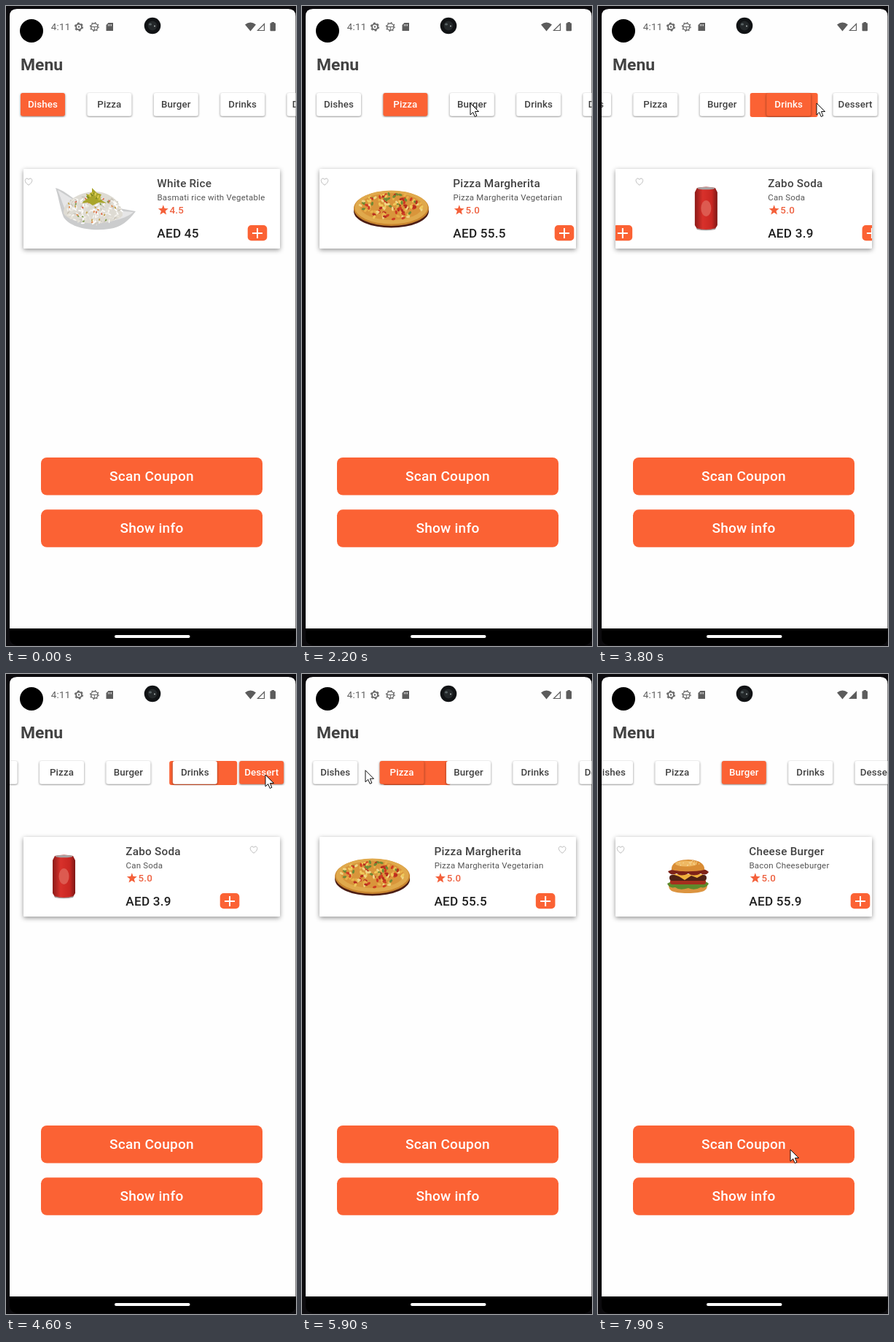
An HTML page that plays this animation: 398x876 px, repeating every 8 s.

```html
<!DOCTYPE html>
<html lang="en">
<head>
<meta charset="utf-8">
<title>Menu</title>
<style>
  html, body { margin: 0; width: 100%; height: 100%; overflow: hidden; background: #0c0b0e; }
  svg { display: block; }
  text { font-family: Roboto, sans-serif; font-weight: 500; letter-spacing: .24px; fill: #424242; }
  .mid { text-anchor: middle; }
  .lifted { filter: drop-shadow(0 1px 1.6px rgba(0,0,0,.48)); }
  .card { filter: drop-shadow(0 2px 3px rgba(0,0,0,.42)); }
  .tab rect { fill: #fff; }
  .tab text { font-size: 13.34px; letter-spacing: .1px; }
  .tab.on rect { fill: #fb6234; }
  .tab.on text { fill: #fff; }
</style>
</head>
<body>
<svg id="stage" width="398" height="876" viewBox="0 0 398 876"></svg>
<script>
const LOOP = 8000, PAGE = 352, PITCH = 91.4, ORANGE = '#fb6234';

let seed = 7;
const random = () => (seed = seed * 16807 % 2147483647) / 2147483647;

const ellipse = (x, y, rx, ry, fill) => `<ellipse cx="${x}" cy="${y}" rx="${rx}" ry="${ry}" fill="${fill}"/>`;
const rect = (x, y, w, h, r, fill) => `<rect x="${x}" y="${y}" width="${w}" height="${h}" rx="${r}" fill="${fill}"/>`;
const path = (d, fill, more = '') => `<path d="${d}" fill="${fill}" ${more}/>`;
const text = (x, y, size, words, more = '') => `<text x="${x}" y="${y}" font-size="${size}" ${more}>${words}</text>`;

// Small scattered grains inside an ellipse
function specks(count, x, y, rx, ry, w, h, colors) {
  let out = '';
  for (let i = 0; i < count; i++) {
    const a = random() * 2 * Math.PI, d = Math.sqrt(random());
    const px = x + Math.cos(a) * d * rx, py = y + Math.sin(a) * d * ry;
    out += `<ellipse rx="${w}" ry="${h}" fill="${colors[i % colors.length]}"
      transform="translate(${px.toFixed(1)} ${py.toFixed(1)}) rotate(${Math.round(random() * 180)})"/>`;
  }
  return out;
}

const rice = path('M68 249C78 252 87 259 96 266L178 281C168 294 158 303 142 305C115 309 88 303 79 289C74 276 72 260 68 249Z', '#cbcccd')
  + path('M71 252C82 258 100 272 120 278L175 282C158 298 100 302 84 287Z', '#e6e6e7')
  + path('M79 284C78 268 100 255 120 254C142 253 160 269 160 287C147 301 92 302 79 284Z', '#dedbd3')
  + specks(150, 120, 279, 39, 20, 2.6, .9, ['#fff', '#f3f1ec', '#c9c4b8', '#fbfaf7', '#e8e4da'])
  + specks(34, 119, 279, 38, 18, 1.6, 1, ['#e08a4e', '#7f9a4a', '#d9694a', '#c4a24a'])
  + path('M104 270L112 263L110 257L118 260L118 249L125 256L131 258L128 264L138 270L127 269L119 273L113 269Z', '#a9a52b')
  + specks(12, 120, 263, 9, 7, 2.4, 1.2, ['#c8bd35', '#7f8a22', '#dccb52']);

const pizza = ellipse(122.5, 281, 51.5, 22.5, '#4b1d14') + ellipse(122.5, 277, 51.5, 24, '#c9852f')
  + ellipse(122.5, 275.5, 50, 23, '#e0a94c') + ellipse(122.5, 274.5, 43, 18.5, '#d9953b')
  + specks(115, 122.5, 274, 43, 18, 2.7, 1.6, ['#cf3b23', '#efc95a', '#6f8a35', '#e8b24a', '#b72d1f', '#f0d583']);

const burger = path('M97 289H150C150 296 145 300 123 300C101 300 97 296 97 289Z', '#dc9440')
  + path('M95 287Q100 283 106 286Q124 282 141 286Q148 282 152 287Q148 294 141 292Q132 297 124 293Q112 297 106 292Q98 294 95 287Z', '#5f8a2c')
  + rect(99, 281, 49, 7, 3, '#a52f1e') + rect(98, 275, 51, 8, 4, '#4f2115')
  + path('M102 274L145 274L136 279L128 276L119 282L111 277Z', '#f0b13c')
  + path('M96 270Q104 266 112 269L135 268Q146 265 152 271Q148 277 141 273Q131 278 124 273Q114 278 108 273Q100 277 96 270Z', '#7d2318')
  + path('M101 268C100 259 110 254 124 254C138 254 147 260 146 268C134 271 112 271 101 268Z', '#d98d35')
  + ellipse(121, 259.5, 15, 4, '#efb862')
  + specks(16, 123, 259, 17, 4, .9, .5, ['#f8dfa8']);

const can = path('M110 249Q122.500 246 135 249L138 255V300L135 305Q122.500 308 110 305L107 300V255Z', 'url(#canRed)')
  + ellipse(122.5, 249.500, 12, 1.8, '#a9a3a3') + path('M109 304Q122 308 136 304L135 306Q122 308.500 110 306Z', '#a49b9b')
  + ellipse(122.5, 277, 7, 11, '#dd5a50');

const cake = path('M108 269L124 263L138 268V288L124 295L109 290Z', '#8e2f2a')
  + path('M108 269L124 263L138 268L124 274Z', '#f0d5d0')
  + path('M109 275L124 280L138 274V277L124 283L109 278ZM109 283L124 288L138 282V285L124 291L109 286Z', '#e9c3b8')
  + path('M124 274V295L138 288V268Z', '#401713', 'opacity=".35"')
  + specks(24, 123, 280, 13, 11, 1.8, 1.1, ['#b9433c', '#5a1d18', '#f3dcd5'])
  + ellipse(118, 265, 5, 4, '#3a1a18') + ellipse(114, 262, 2.5, 2, '#56231f')
  + ellipse(126, 268, 5, 3.5, '#f7e8e4') + ellipse(131, 265, 3, 2.5, '#d66a68');

// tab, title, subtitle, rating, price, centre of the add button, picture
const items = [
  ['Dishes', 'White Rice', 'Basmati rice with Vegetable', '4.5', '45', 345, rice],
  ['Pizza', 'Pizza Margherita', 'Pizza Margherita Vegetarian', '5.0', '55.5', 360, pizza],
  ['Burger', 'Cheese Burger', 'Bacon Cheeseburger', '5.0', '55.9', 360, burger],
  ['Drinks', 'Zabo Soda', 'Can Soda', '5.0', '3.9', 350, can],
  ['Dessert', 'Cupcake Strawberry', 'Brown and Pink Dessert', '5.0', '10.9', 360, cake],
];

const star = Array.from({ length: 10 }, (_, i) => {
  const r = i % 2 ? 3.1 : 7.4, a = i * Math.PI / 5;
  return (215.8 + r * Math.sin(a)).toFixed(1) + ',' + (279.6 - r * Math.cos(a)).toFixed(1);
}).join(' ');

const page = ([, title, sub, rating, price, plus, picture]) => `<g class="page">${picture}
  ${path('M31 245.200C24 240.500 26 236 28.800 236Q30.300 236 31 237.600Q31.700 236 33.200 236C36 236 38 240.500 31 245.200Z', 'none', 'stroke="#b5b5b5" stroke-width=".9"')}
  ${text(207.3, 248, 15.25, title)}
  ${text(207.5, 265.5, 11.44, sub, 'style="font-weight:400;fill:#555"')}
  <polygon points="${star}" fill="#f4603a"/>
  ${text(224.5, 284, 13.34, rating, 'style="fill:#ee6140"')}
  ${text(207.3, 316.5, 17.15, 'AED ' + price, 'style="fill:#1f1f1f"')}
  ${rect(plus - 13.3, 300, 26.6, 21.3, 5, ORANGE)}
  ${path(`M${plus - 7} 311H${plus + 7}M${plus} 304V318`, 'none', 'stroke="#fff" stroke-width="2"')}</g>`;

const tab = ([name], i) => `<g class="tab" transform="translate(${20 + PITCH * i})">
  <g class="lifted"><rect y="119" width="61" height="31.800" rx="3"/></g>${text(30.5, 139, 13.34, name, 'class="mid"')}</g>`;

const button = (y, label) => rect(48, y, 304, 51.5, 8, ORANGE)
  + text(200, y + 32, 19.06, label, 'class="mid" style="fill:#fff"');

const status = text(61.8, 33, 13.34, '4:11', 'style="font-weight:400;fill:#5e5e5e"')
  + `<g fill="none" stroke="#666">
    <circle cx="100" cy="28.500" r="3.900" stroke-width="1.800"/><circle cx="100" cy="28.500" r="5.300" stroke-width="1.600" stroke-dasharray="2.800 2.750"/>
    <circle cx="121.300" cy="28.500" r="4.700" stroke-width="1.400"/><circle cx="121.300" cy="28.500" r="5.900" stroke-width="1.200" stroke-dasharray="1.700 2.930"/>
    <path d="M116.500 28.500H126M121.300 28.500V33"/></g>`
  + ellipse(100, 28.5, 1.2, 1.2, '#666')
  + path('M140.500 23H147V34H137.500V26Z', '#5c5c5c') + path('M140.500 25V27.500M142.500 25V27.500M144.500 25V27.500', 'none', 'stroke="#fff" stroke-width=".8"')
  + path('M328 25.500Q335.500 19.500 343 25.500L335.500 34.500Z', '#5c5c5c')
  + path('M345.500 33.500H354.500V24.500Z', 'none', 'id="signal" stroke="#5c5c5c" stroke-width="1.200"')
  + rect(362.5, 23.3, 7.5, 11, 1, '#5c5c5c') + rect(364.5, 22, 3.5, 2, 0, '#5c5c5c');

stage.innerHTML = `<defs>
  <clipPath id="cardClip"><rect x="24" y="223" width="352" height="109"/></clipPath>
  <clipPath id="tabClip"><rect x="5" y="118" width="392.500" height="34.500"/></clipPath>
  <linearGradient id="canRed"><stop stop-color="#8c1a18"/><stop offset=".35" stop-color="#d8312b"/><stop offset=".75" stop-color="#c92722"/><stop offset="1" stop-color="#7d1715"/></linearGradient></defs>
  ${rect(5, 4, 392.5, 871, 10, '#000')}
  ${path('M5 852V14Q5 4 15 4H387.500Q397.500 4 397.500 14V852Z', '#fefefe')}
  ${rect(149, 861, 103.5, 4, 2, '#fff')}
  ${ellipse(35, 34, 16, 16, '#000')}${status}
  ${ellipse(201, 27, 11.3, 11.3, '#111315')}${ellipse(201, 27, 6.5, 6.5, '#24282a')}${ellipse(198, 25, 2, 1.5, '#596264')}${ellipse(204, 27.5, 1, 1, '#aeb6b6')}
  ${text(20, 88, 22.9, 'Menu', 'style="font-weight:700;letter-spacing:0"')}
  <g clip-path="url(#tabClip)"><g id="tabs"><rect id="slider" y="119" width="93" height="33" rx="3" fill="${ORANGE}"/>${items.map(tab).join('')}</g></g>
  <g class="card">${rect(24, 223, 352, 109, 1, '#fff')}</g>
  <g clip-path="url(#cardClip)">${items.map(page).join('')}</g>
  ${button(618, 'Scan Coupon')}${button(689.3, 'Show info')}
  ${path('M0 0V16L3.700 12.500L6.200 18.500L8.900 17.300L6.400 11.500H11.500Z', '#fff', 'id="cursor" stroke="#111" stroke-linejoin="round"')}`;

const $ = id => document.getElementById(id);
const tabs = document.querySelectorAll('.tab'), pages = document.querySelectorAll('.page');

// [time, tab]
const taps = [[-999, 0], [1650, 1], [2700, 2], [3600, 3], [4566, 4], [5700, 1], [6699, 2]];
// [time, x, y]
const moves = [[100, 338, 706], [900, 190, 230], [1450, 142, 133], [1900, 142, 133], [2200, 231, 133], [2400, 234, 134],
  [2950, 234, 134], [3300, 300, 133], [3850, 300, 133], [4200, 356, 138], [4900, 356, 138], [5500, 87, 130],
  [6000, 87, 132], [6500, 254, 141], [7000, 254, 141], [7550, 263, 640], [7850, 264, 651], [LOOP, 264, 651]];

const mix = (a, b, k) => a + (b - a) * k;
const scrollFor = i => Math.max(0, Math.min(65.4, 15 + PITCH * (i - 1) - 73.4));

// cubic-bezier(.25, .1, .25, 1)
function ease(x) {
  if (x >= 1) return 1;
  let lo = 0, hi = 1;
  for (let i = 0; i < 20; i++) {
    const s = (lo + hi) / 2;
    if (.75 * s * (1 - s) + s ** 3 < x) lo = s; else hi = s;
  }
  return .3 * lo * (1 - lo) ** 2 + 3 * lo * lo * (1 - lo) + lo ** 3;
}

function draw(t) {
  const n = taps.findLastIndex(tap => tap[0] <= t);
  const to = taps[n][1], from = n ? taps[n - 1][1] : to;
  const k = ease((t - taps[n][0]) / 300), side = Math.sign(to - from) * PAGE;

  tabs.forEach((el, i) => el.classList.toggle('on', i === to));
  $('tabs').setAttribute('transform', `translate(${-mix(scrollFor(from), scrollFor(to), k)})`);
  $('slider').setAttribute('x', 4.2 + PITCH * mix(from, to, k));
  $('slider').style.display = k < 1 ? '' : 'none';

  // Distant pages slide as if they were neighbours
  pages.forEach((el, i) => {
    el.style.display = i === to || (i === from && k < 1) ? '' : 'none';
    el.setAttribute('transform', `translate(${i === to ? side * (1 - k) : -side * k})`);
  });

  const m = Math.max(0, moves.findLastIndex(p => p[0] <= t));
  const [t0, x0, y0] = moves[m], [t1, x1, y1] = moves[m + 1];
  const p = Math.max(0, (t - t0) / (t1 - t0)), q = p * p * (3 - 2 * p);
  $('cursor').setAttribute('transform', `translate(${mix(x0, x1, q)} ${mix(y0, y1, q)})`);
  $('cursor').style.display = t < 100 ? 'none' : '';
  $('signal').setAttribute('fill', t < 7700 ? 'none' : '#5c5c5c');
}

function tick() {
  draw(performance.now() % LOOP);
  requestAnimationFrame(tick);
}
tick();
</script>
</body>
</html>
```
